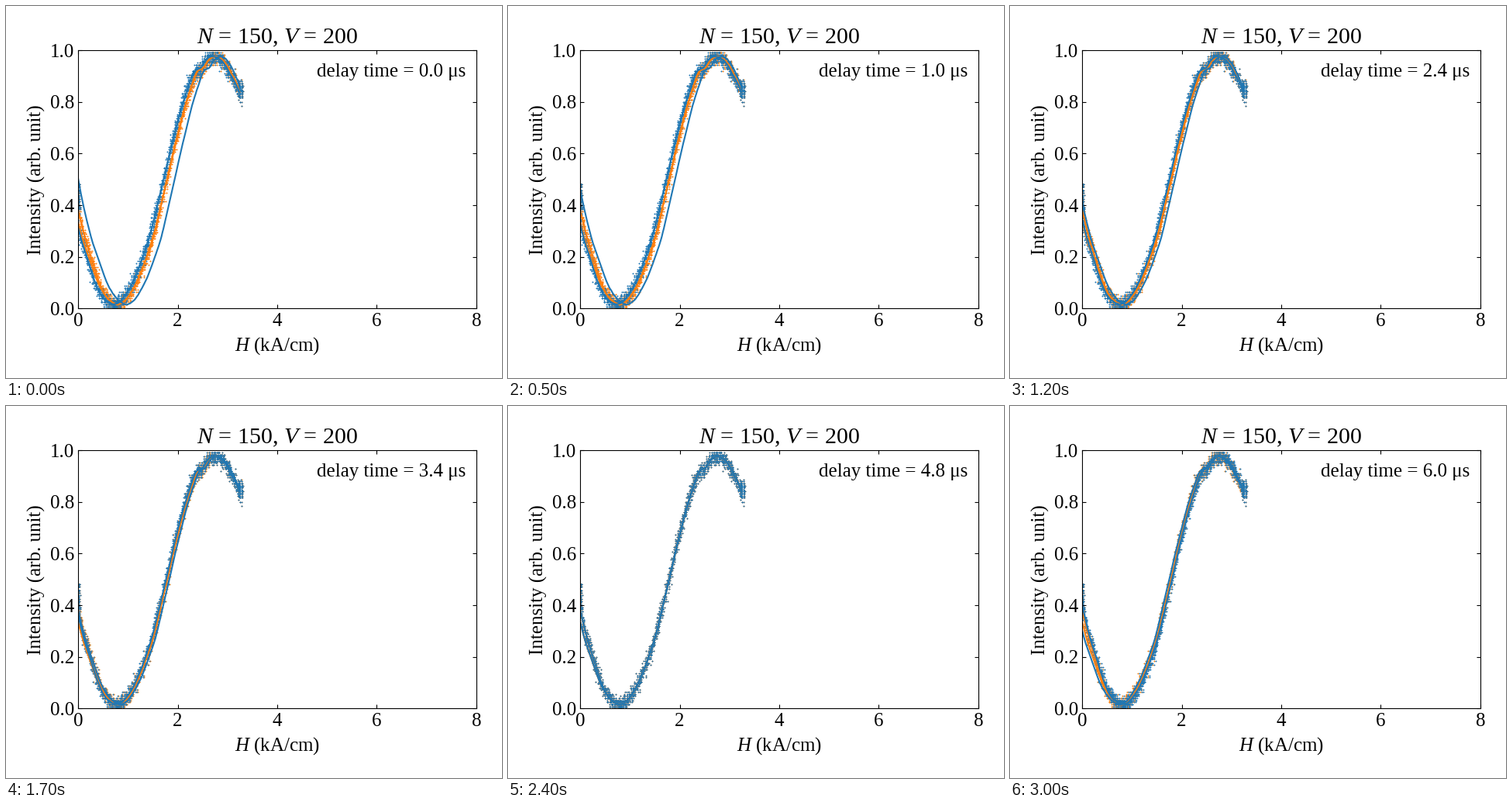
Write a matplotlib script that moves like this. It is 640x480 px and loops after 3100 ms.

```python
import numpy as np
import matplotlib.pyplot as plt
from matplotlib.animation import FuncAnimation

W, H, DPI = 640, 480, 100
LEFT, RIGHT, TOP, BOTTOM = 93.1, 606.9, 57.2, 390.3  # axes edges, px
FRAMES, INTERVAL = 31, 100
BLUE, ORANGE = "#1f77b4", "#ff7f0e"
H_MAX = 3.28
T_CLOSED = 4.8  # delay (µs) at which the loop closes

plt.rcParams.update({
    "font.family": "Liberation Serif",
    "font.size": 18,
    "mathtext.fontset": "custom",
    "mathtext.rm": "Liberation Serif",
    "mathtext.it": "Liberation Serif:italic",
})

KNOTS = np.array([
    (-0.25, 0.62), (0.0, 0.385), (0.13, 0.280), (0.26, 0.198), (0.46, 0.085),
    (0.63, 0.034), (0.79, 0.016), (0.97, 0.037), (1.18, 0.104), (1.34, 0.178),
    (1.5, 0.272), (1.75, 0.470), (2.0, 0.675), (2.2, 0.815), (2.4, 0.912),
    (2.6, 0.960), (2.8, 0.976), (2.95, 0.953), (3.1, 0.903), (3.28, 0.825),
    (3.5, 0.71),
])
KX, KY = KNOTS.T
SLOPES = np.gradient(KY, KX)


def intensity(h):
    """Cubic Hermite curve through the knots, with a small kink near 2.4."""
    i = np.clip(np.searchsorted(KX, h) - 1, 0, len(KX) - 2)
    step = KX[i + 1] - KX[i]
    t = (h - KX[i]) / step
    y = ((1 + 2 * t) * (1 - t) ** 2 * KY[i]
         + t * (1 - t) ** 2 * step * SLOPES[i]
         + t * t * (3 - 2 * t) * KY[i + 1]
         + t * t * (t - 1) * step * SLOPES[i + 1])
    return (y + 0.010 * np.exp(-((h - 2.37) / 0.06) ** 2)
            - 0.012 * np.exp(-((h - 2.52) / 0.06) ** 2))


def taper(h):
    return np.sqrt(np.clip(1 - (h / H_MAX) ** 2, 0, 1))


def rising(h, delay):
    s = 1 - delay / T_CLOSED
    return h + 0.18 * s * taper(h) - 0.055 * np.exp(-(h / 0.5) ** 2)


def falling(h, delay):
    s = 1 - delay / T_CLOSED
    return h - 0.085 * s * taper(h)


rng = np.random.default_rng(7)


def ripple(n):
    """Smooth residual noise of an averaged line."""
    noise = np.convolve(rng.normal(size=n + 20), np.ones(7) / 7, "same")
    return 0.004 * noise[10:-10]


def snap(values, step):
    return np.round(values / step) * step


line_h = np.linspace(-0.2, 3.25, 180)
line_up = intensity(line_h) + ripple(len(line_h))
line_down = intensity(line_h) + ripple(len(line_h))

# Noisy samples on the grid of the digitiser
H_STEP, I_STEP = 0.0156, 0.008
sweep = rng.uniform(-0.08, 3.25, 2400)
sweep_i = intensity(sweep) + rng.normal(0, 0.013, len(sweep))
sweep_h = snap(sweep + rng.normal(0, 0.022, len(sweep)), H_STEP)
# Samples resting at the two ends of the sweep
rest_h = snap(np.concatenate([np.abs(rng.normal(0, 0.022, 80)),
                              rng.normal(3.25, 0.025, 150)]), H_STEP)
rest_i = np.concatenate([rng.uniform(0.36, 0.48, 80),
                         rng.normal(0.845, 0.02, 150)])
dot_i = np.clip(snap(np.concatenate([sweep_i, rest_i]), I_STEP),
                I_STEP, 1 - I_STEP)


def dots_x(delay):
    return np.concatenate([falling(sweep_h, delay), rest_h])


fig = plt.figure(figsize=(W / DPI, H / DPI), dpi=DPI, facecolor="white")
ax = fig.add_axes([LEFT / W, 1 - BOTTOM / H,
                   (RIGHT - LEFT) / W, (BOTTOM - TOP) / H])
ax.set_xlim(0, 8)
ax.set_ylim(0, 1)
ax.set_xticks(range(0, 9, 2))
ax.set_yticks(np.arange(6) / 5)
ax.tick_params(direction="in", top=True, right=True)
ax.tick_params(axis="x", pad=4)
ax.set_title("$N$ = 150, $V$ = 200")
fig.text(350 / W, 1 - 445 / H, "$H$ (kA/cm)", ha="center", va="baseline")
fig.text(46 / W, 1 - 224 / H, "Intensity (arb. unit)", rotation=90,
         rotation_mode="anchor", ha="center", va="baseline")
label = ax.text(4.79, 0.9, "")


def add_loop(color):
    dots, = ax.plot([], [], "+", color=color, ms=1.7, mew=0.7, zorder=1)
    up, = ax.plot([], [], color=color, lw=1.5, zorder=2)
    down, = ax.plot([], [], color=color, lw=1.5, zorder=2)
    return dots, up, down


def set_loop(loop, delay):
    dots, up, down = loop
    dots.set_data(dots_x(delay), dot_i)
    up.set_data(rising(line_h, delay), line_up)
    down.set_data(falling(line_h, delay), line_down)


fixed = add_loop(ORANGE)
moving = add_loop(BLUE)
set_loop(fixed, T_CLOSED)


def draw(frame):
    delay = 0.2 * frame
    set_loop(moving, delay)
    label.set_text(f"delay time = {delay:.1f} μs")
    return (*moving, label)


anim = FuncAnimation(fig, draw, frames=FRAMES, interval=INTERVAL,
                     repeat=True, repeat_delay=0, blit=False)
plt.show()
```
